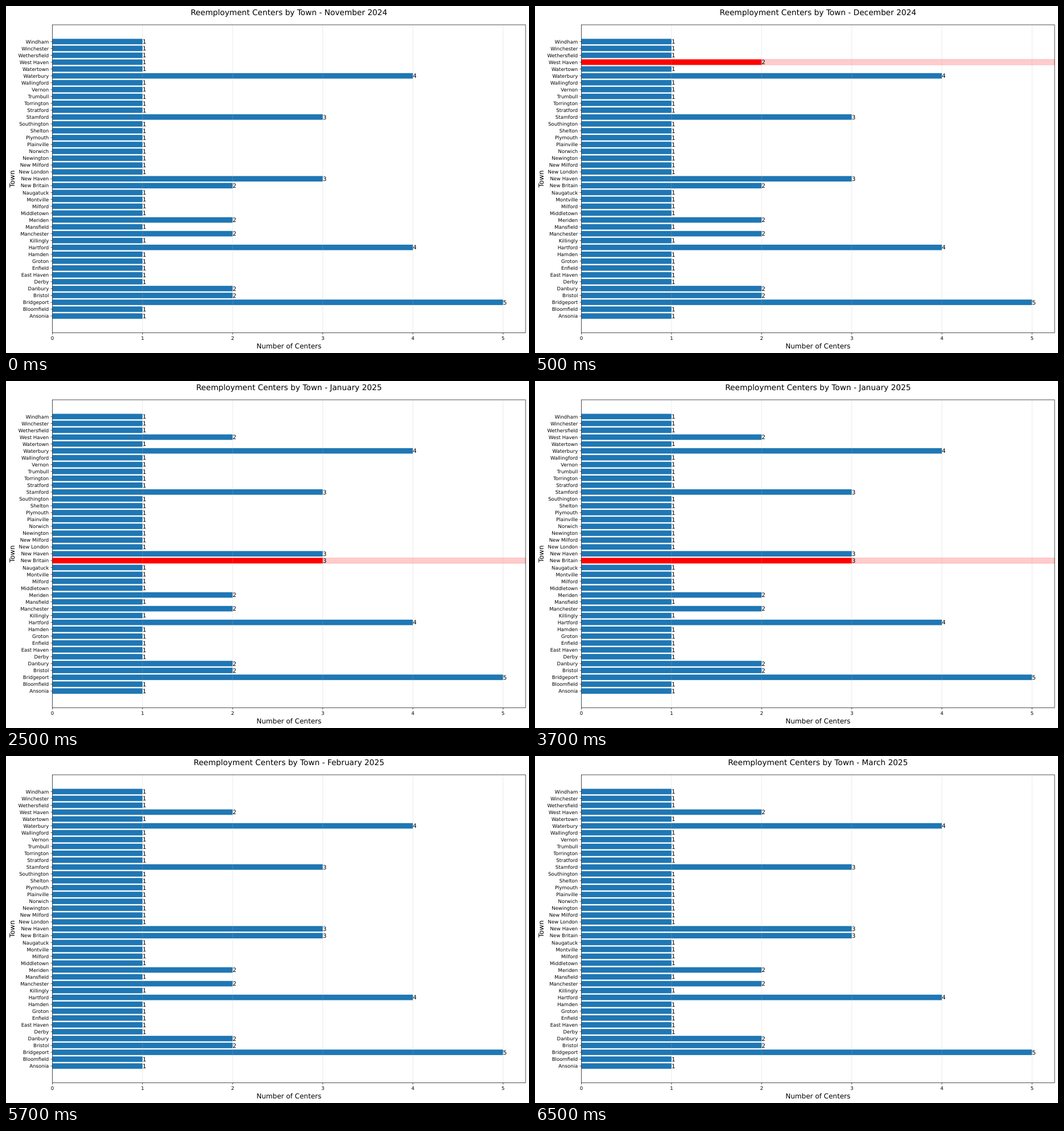
Recreate the animation shown at these times as an HTML page. Size 919 px wide and 609 px high, loop 8 s.

```html
<!DOCTYPE html>
<html lang="en">
<head>
<meta charset="utf-8">
<title>Reemployment Centers by Town</title>
<style>
  html, body { margin: 0; width: 100%; height: 100%; overflow: hidden; background: #fff; }
  svg { display: block; width: 919px; height: 609px; }
  text { font-family: "DejaVu Sans", Verdana, sans-serif; fill: #000; text-rendering: geometricPrecision; }
</style>
</head>
<body>
<svg id="chart" viewBox="0 0 919 609"></svg>
<script>
const LOOP = 8000;
const PT = 0.857; // pixels per point
const BLUE = '#1f77b4', RED = '#ff0000';
const box = { left: 81.5, right: 913, top: 33, bottom: 573.5 };
const unit = (box.right - box.left) / 5.25;
const step = (box.bottom - box.top) / 44.88;
const barH = 0.8 * step;

const towns = ['Windham', 'Winchester', 'Wethersfield', 'West Haven', 'Watertown',
  'Waterbury', 'Wallingford', 'Vernon', 'Trumbull', 'Torrington', 'Stratford',
  'Stamford', 'Southington', 'Shelton', 'Plymouth', 'Plainville', 'Norwich',
  'Newington', 'New Milford', 'New London', 'New Haven', 'New Britain',
  'Naugatuck', 'Montville', 'Milford', 'Middletown', 'Meriden', 'Mansfield',
  'Manchester', 'Killingly', 'Hartford', 'Hamden', 'Groton', 'Enfield',
  'East Haven', 'Derby', 'Danbury', 'Bristol', 'Bridgeport', 'Bloomfield', 'Ansonia'];

// Towns with more than one center at the start
const counts = { Waterbury: 4, Stamford: 3, 'New Haven': 3, 'New Britain': 2, Meriden: 2,
  Manchester: 2, Hartford: 4, Danbury: 2, Bristol: 2, Bridgeport: 5 };

const months = [
  { at: 0, name: 'November 2024' },
  { at: 500, name: 'December 2024', town: 'West Haven', count: 2 },
  { at: 2500, name: 'January 2025', town: 'New Britain', count: 3 },
  { at: 4500, name: 'February 2025' },
  { at: 6500, name: 'March 2025' }
];

const svg = document.getElementById('chart');

function add(tag, attrs, content) {
  const el = document.createElementNS('http://www.w3.org/2000/svg', tag);
  for (const key in attrs) el.setAttribute(key, attrs[key]);
  if (content !== undefined) el.textContent = content;
  return svg.appendChild(el);
}

const label = (x, y, points, anchor, content, extra) =>
  add('text', { x, y, 'font-size': points * PT, 'text-anchor': anchor, ...extra }, content);

const line = (x1, y1, x2, y2, extra) =>
  add('line', { x1, y1, x2, y2, stroke: '#000', 'stroke-width': 0.8 * PT, ...extra });

const xOf = value => box.left + value * unit;
const yOf = row => box.top + (row + 2.44) * step;
const midX = (box.left + box.right) / 2;

const bars = towns.map((town, row) =>
  add('rect', { x: box.left, y: yOf(row) - barH / 2, height: barH }));

const band = add('rect', {
  x: box.left, width: box.right - box.left, height: barH, fill: RED, 'fill-opacity': 0.2,
  stroke: RED, 'stroke-opacity': 0.2, 'stroke-width': PT
});

for (let n = 0; n <= 5; n++) {
  const x = xOf(n);
  line(x, box.top, x, box.bottom, { stroke: '#b0b0b0', 'stroke-opacity': 0.4 });
  line(x, box.bottom, x, box.bottom + 3);
  label(x, 586.4, 10, 'middle', n);
}

const values = towns.map((town, row) => {
  const y = yOf(row);
  line(box.left - 3, y, box.left, y);
  label(box.left - 6.2, y + 3.2, 10, 'end', town);
  return label(0, y + 3.8, 12, 'start', '');
});

add('rect', {
  x: box.left, y: box.top, width: box.right - box.left, height: box.bottom - box.top,
  fill: 'none', stroke: '#000', 'stroke-width': 0.8 * PT
});
label(midX, 601, 14, 'middle', 'Number of Centers');
label(0, 0, 14, 'middle', 'Town', { transform: 'translate(15.3 303.5) rotate(-90)' });
const title = label(midX, 16, 16, 'middle', '');

function show(index) {
  const now = { ...counts };
  months.slice(0, index + 1).forEach(m => { if (m.town) now[m.town] = m.count; });
  const { name, town: changed } = months[index];
  title.textContent = 'Reemployment Centers by Town - ' + name;
  towns.forEach((town, row) => {
    const count = now[town] || 1;
    bars[row].setAttribute('width', count * unit);
    bars[row].setAttribute('fill', town === changed ? RED : BLUE);
    values[row].setAttribute('x', xOf(count));
    values[row].textContent = count;
  });
  band.setAttribute('visibility', changed ? 'visible' : 'hidden');
  if (changed) band.setAttribute('y', yOf(towns.indexOf(changed)) - barH / 2);
}

let current = 0;
show(current);
const start = performance.now();

function tick() {
  const t = (performance.now() - start) % LOOP;
  const index = months.filter(m => m.at <= t).length - 1;
  if (index !== current) show(current = index);
  requestAnimationFrame(tick);
}
requestAnimationFrame(tick);
</script>
</body>
</html>
```
